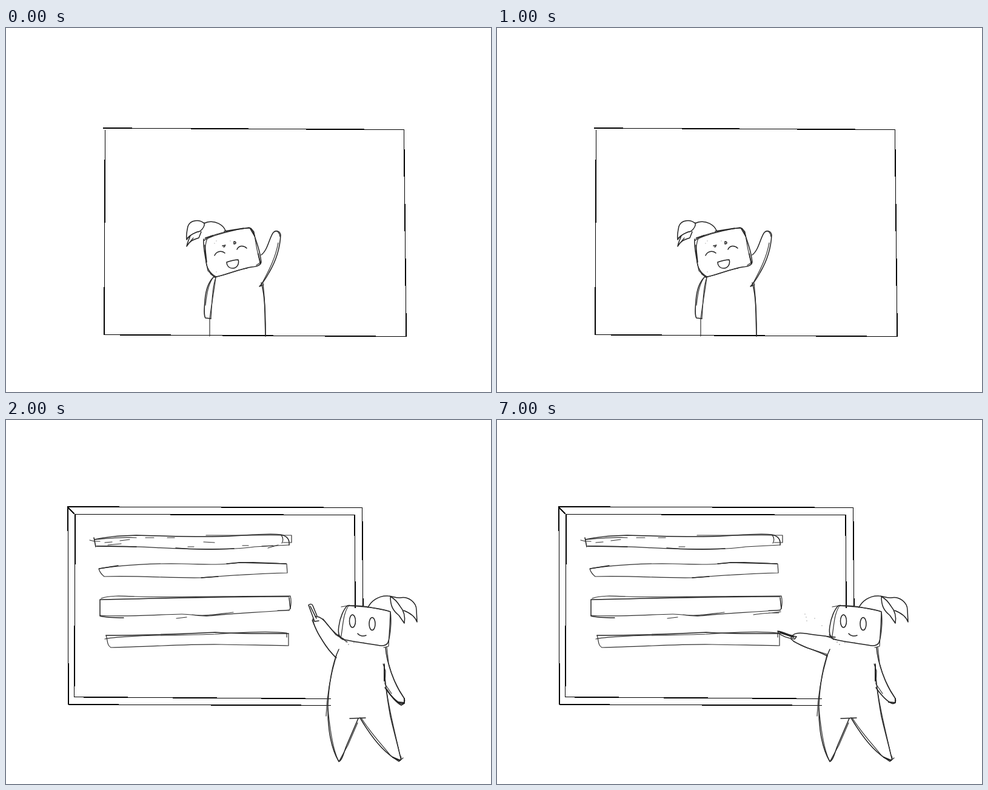
Recreate the animation shown at these times as an HTML page. Size 800x600 px, loop 8000 ms.

```html
<!DOCTYPE html>
<html lang="en">
<head>
<meta charset="utf-8">
<title>Waving and teaching sketch</title>
<style>
  html, body { margin: 0; width: 100%; height: 100%; overflow: hidden; background: #fff; }
  svg { display: block; width: 800px; height: 600px; }
  path, ellipse { fill: none; stroke: #222; stroke-width: 1.5; stroke-linecap: round; stroke-linejoin: round; }
  .fine { stroke: #303030; stroke-width: 1.2; }
  .bold { stroke-width: 2; }
  .ruled { stroke: #000; stroke-width: 1.5; stroke-linecap: butt; shape-rendering: crispEdges; }
  .dots { stroke: #444; stroke-width: 1.3; }
  .erase { fill: #fff; stroke: none; shape-rendering: crispEdges; }
  [data-show] { display: none; }
</style>
</head>
<body>
<svg viewBox="0 0 800 600">
  <!-- Waving -->
  <g data-show="0 2000">
    <path class="ruled" d="M160 165L657 167.6"/>
    <path class="ruled" d="M656.4 167L660.2 509"/>
    <path class="ruled" d="M162 505.6L660 508.55"/>
    <path class="ruled" d="M163.5 168L161.9 506"/>

    <!-- hair -->
    <path d="M362 334C358 324 345 317 332 320L327 322C319 315 304 316 300 327C298 336 297 342 298 349C303 341 313 336 320 335C325 331 328 326 327 321"/>
    <path d="M304 342C302 349 299 353 298 360C302 352 308 349 318 346L322 336"/>
    <path class="fine" d="M299 346C305 340 312 337 321 335M299 358L309 346"/>

    <!-- head -->
    <path d="M327 350C338 342 378 332 401 329C407 331 409 339 411 346C416 360 420 375 421 386C419 392 414 393 405 394C385 397 362 408 346 410C336 404 331 395 330 385C328 372 325 360 326 348"/>
    <path class="fine" d="M328 347C350 337 386 330 404 330L409 336C411 350 415 371 419 387L413 391"/>
    <path class="fine" d="M332 347C326 360 329 384 333 400L344 411C360 408 377 399 398 396"/>
    <path d="M329 346L341 342M360 335L392 330M403 331L410 343M328 358L331 386M416 372L420 389"/>
    <path d="M344 375C347 368 356 366 361 371M381 365C384 358 392 358 397 363"/>
    <path d="M364 386C370 384 377 382 383 382C385 389 381 396 374 396C367 396 364 391 364 386Z"/>
    <path d="M357 359L362 358M359 361L361 360M376 352C380 352 380 356 376 356Z"/>
    <path class="dots" d="M347 351h0M344 355h0M370 351h0M347 402h0" stroke-opacity=".5"/>

    <!-- body -->
    <path class="fine" d="M346 410C344 430 338 460 336 480V508"/>
    <path d="M343 410C333 419 329 436 328 450C327 462 326 474 329 478L338 479"/>
    <path class="fine" d="M337 405L346 412C341 424 340 447 338 479M341 412C333 425 331 439 329 457"/>
    <path d="M421 420C425 432 427 455 427 470L428 508"/>
    <path class="fine" d="M424 420C426 440 429 470 428 508"/>
  </g>
  <g data-show="0 500 1000 1500">
    <path d="M421 374C432 366 434 346 441 337C445 332 452 335 453 341C452 363 444 386 434 403C428 414 424 420 418 426"/>
    <path class="fine" d="M449 354C445 377 435 398 420 425M443 336C447 333 451 337 452 344M419 426L425 423"/>
  </g>
  <g data-show="500 1000 1500 2000">
    <path class="bold" d="M421 374C431 364 445 352 458 347C464 345 469 348 469 353C467 358 458 360 451 367"/>
    <path d="M466 356C448 366 436 384 430 401C427 411 422 419 419 425"/>
    <path class="fine" d="M453 366C438 377 430 402 421 418L418 427L424 422"/>
    <path class="erase" d="M349 507H362V509H349Z"/>
    <path class="dots" d="M348 507.5h0"/>
  </g>
  <path class="erase" data-show="500 1000" d="M341 505H344V509H341Z"/>

  <!-- Teaching -->
  <g data-show="2000 8000">
    <path class="ruled" d="M101 143L588 144.45"/>
    <path class="ruled" d="M587.58 145L588.87 308"/>
    <path class="ruled" d="M102.17 143L102.92 469"/>
    <path class="ruled" d="M103 468.98L536 470.42"/>
    <path class="ruled" d="M113 155.33L576 156.58"/>
    <path class="ruled" d="M575.02 156L576.05 310"/>
    <path class="ruled" d="M114.19 155L112.68 457"/>
    <path class="ruled" d="M112 456.65L536 459.55"/>
    <path class="ruled" d="M102 144L113 155"/>

    <!-- lines on the board -->
    <path d="M145 194L148 209M146 197C165 193 180 191 215 190C270 191 300 193 350 192C390 191 430 186 453 189C464 191 468 197 467 206"/>
    <path class="fine" d="M330 190L471 190V202H457M148 208C200 207 250 211 290 212C340 214 382 213 410 209L467 206"/>
    <path d="M150 208L215 209M280 211C310 214 350 213 376 212"/>
    <path class="fine" d="M138 198L146 200H155M148 197C180 194 200 193 215 194M163 202l12 -1M188 199l16 -2M230 194h14M266 194h12M300 209h10M454 190C458 194 457 200 455 203"/>
    <path class="fine" d="M153 245C190 239 245 236 290 237S345 239 365 237C400 233 430 235 463 237L464 252C410 253 360 257 322 260C270 261 220 256 162 258C157 254 154 249 153 245"/>
    <path d="M154 245L185 240M364 237L385 235L462 237M322 260L350 258"/>
    <path d="M155 296V323C166 326 180 326 194 326M155 296C240 295 330 291 467 291"/>
    <path class="fine" d="M157 294C170 289 190 290 212 291C290 293 370 290 469 290C471 299 471 307 467 314H448"/>
    <path class="fine" d="M155 322C200 325 240 321 290 320C307 320 320 324 335 323C380 318 425 317 467 313M281 327L298 325M307 321C330 324 350 320 375 317"/>
    <path d="M467 293L469 311"/>
    <path class="fine" d="M163 361C195 354 300 355 345 353C400 349 440 348 463 351V358"/>
    <path d="M165 355C240 355 300 352 345 350C390 353 430 352 466 352"/>
    <path class="fine" d="M165 355C168 363 166 371 173 375C235 374 300 369 355 370C400 371 440 371 466 372V352"/>

    <!-- hair -->
    <path d="M597 309C602 299 614 289 630 290C638 290 643 294 650 293C664 290 677 301 677 313L678 333C674 322 664 317 656 314"/>
    <path d="M634 291C634 306 638 314 648 322L657 335C659 323 656 314 650 307C645 299 640 294 634 291"/>

    <!-- head -->
    <path d="M563 306C580 307 612 308 634 316C636 332 634 355 630 367C627 372 620 373 612 371C595 368 575 366 558 362C550 360 547 352 549 340C551 325 557 312 563 306"/>
    <path class="fine" d="M553 308C570 304 588 306 602 309L631 315M566 305C555 319 556 343 552 360M634 318L631 373L623 375M548 354L555 362"/>
    <ellipse cx="571.5" cy="331.5" rx="5" ry="10.5"/>
    <ellipse cx="604" cy="336" rx="5" ry="10.5"/>
    <path d="M580 352C583 356 589 357 594 355"/>
    <path class="dots" d="M561 366h0M565 370h0M577 366h0M574 367h0M590 367h0"/>

    <!-- body -->
    <path d="M549 378C538 400 532 440 531 470C530 510 537 543 549 563C555 561 558 545 562 536L581 492"/>
    <path class="fine" d="M545 388C534 425 529 459 528 488M531 475C535 519 540 546 549 563L564 536L580 499"/>
    <path d="M567 492L593 491M584 491C597 513 620 547 645 560C652 563 653 557 650 553C645 532 639 510 634 488C629 460 624 430 624 402"/>
    <path class="fine" d="M586 491C602 517 620 535 635 554L648 563L655 557M628 448C634 488 643 520 651 558"/>
    <path d="M626 375C628 400 640 435 655 456C660 463 657 469 651 467C642 463 632 451 625 441"/>
    <path class="fine" d="M628 374L631 401C636 421 645 441 656 457M622 402L626 414L625 435L636 451"/>
    <path class="bold" d="M624 404V430M638 556L650 561M646 465L657 466V459"/>
  </g>
  <g data-show="2000 5500">
    <path d="M510 324C518 323 525 330 530 337C538 347 548 357 557 361M506 328C508 340 515 353 521 362C530 377 538 386 545 392"/>
    <path class="fine" d="M505 330C515 356 530 377 543 391M523 328L544 354L563 366"/>
    <path d="M499 305L509 332L516 331M499 305C502 303 505 303 506 306L513 323M502 307L512 327"/>
    <path class="fine" d="M422 208L440 207M432 211L449 206M168 206L190 204M326 201l18 1M390 207h10"/>
    <path class="bold" d="M628 444C635 456 645 466 652 470L657 467V459"/>
  </g>
  <g data-show="5500 8000">
    <path d="M485 359C488 352 494 350 510 352C530 355 545 357 558 358M485 361C491 367 500 371 510 375C525 380 535 384 545 389"/>
    <path class="fine" d="M489 365L513 376L544 386L543 393M541 356L560 362"/>
    <path d="M463 348C470 348 482 355 494 357L491 361C480 360 470 356 464 351ZM467 351L490 358"/>
    <path class="bold" d="M465 349L489 358"/>
    <path class="fine" d="M423 321C438 318 452 319 468 316M448 318H465"/>
    <path class="dots" d="M508 320h0M510 325h0M511 331h0M524 327h0M536 339h0" stroke-opacity=".6"/>
  </g>
</svg>
<script>
  const LOOP = 8000;
  // data-show holds pairs of start and end times in ms.
  const parts = [...document.querySelectorAll('[data-show]')].map(element => ({
    element,
    times: element.dataset.show.split(' ').map(Number)
  }));

  function draw() {
    const time = performance.now() % LOOP;
    for (const { element, times } of parts) {
      const visible = times.filter(edge => edge <= time).length % 2 === 1;
      element.style.display = visible ? 'inline' : 'none';
    }
    requestAnimationFrame(draw);
  }
  draw();
</script>
</body>
</html>
```
